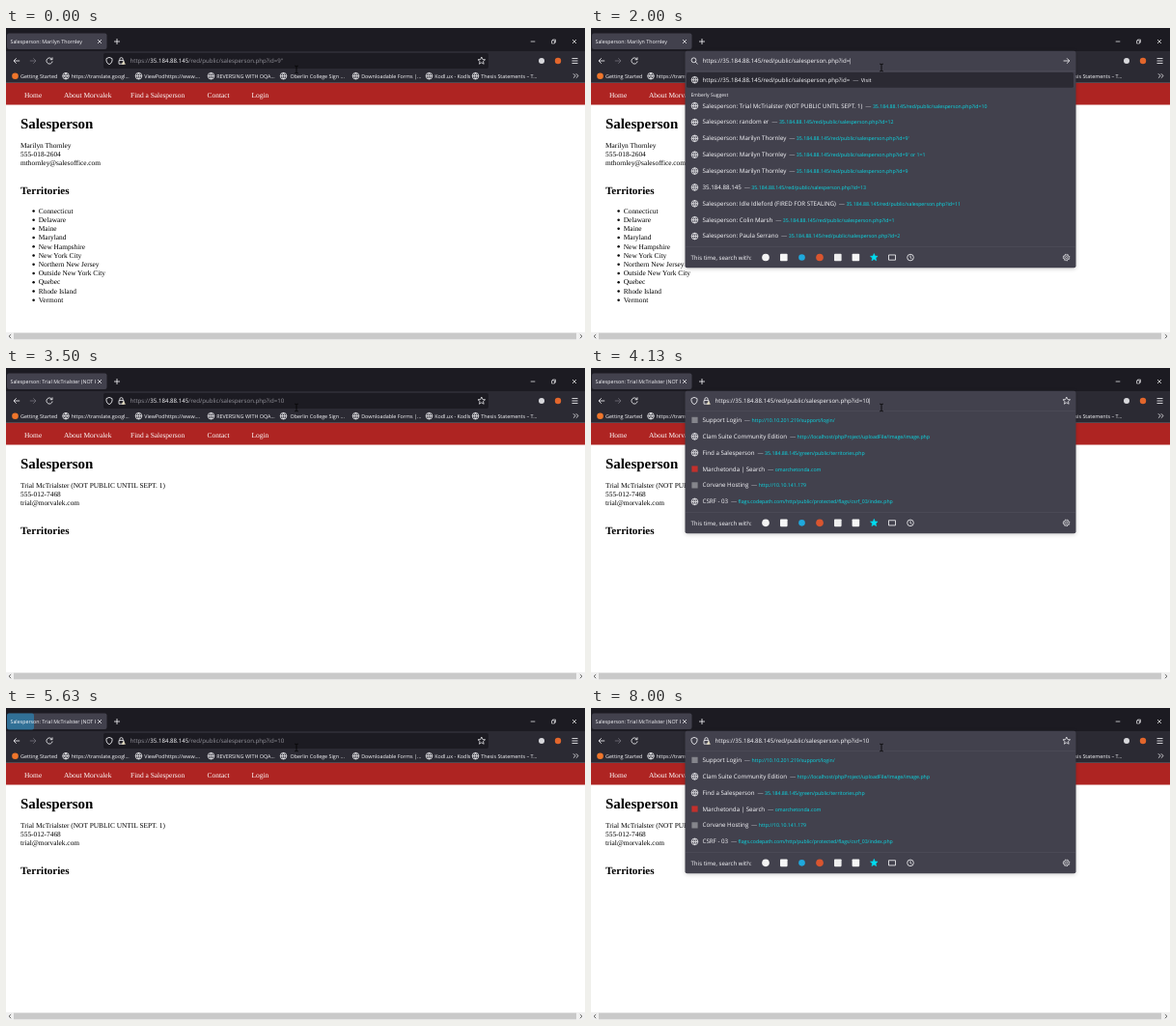
These frames come from a looping animation (600x323 px, 8120 ms). An HTML page:

```html
<!DOCTYPE html>
<html lang="en">
<head>
<meta charset="utf-8">
<title>Salesperson lookup</title>
<style>
html, body { margin: 0; width: 100%; height: 100%; overflow: hidden; background: #fff; }
#stage { display: block; width: 600px; height: 323px; }
text { font-family: "Open Sans", "Noto Sans", sans-serif; text-rendering: geometricPrecision; white-space: pre; }
.page { font-family: "Liberation Serif", "Times New Roman", serif; }
.shadow { filter: drop-shadow(0 1px 2px #0003); }
</style>
</head>
<body>
<svg id="stage" viewBox="0 0 600 323"></svg>
<script>
const LOOP = 8120, ROW = 16.87;
const LIGHT = '#fbfbfe', PANEL = '#42414d', BAR = '#2b2a33', DARK = '#1c1b22', CYAN = '#08dde8';
const HOST = '35.184.88.145', PATH = '/red/public/salesperson.php?id=';

// start, page, id in the address bar, mode of the drop-down
const CLOSED = 0, TOP = 1, STALE = 2, MATCH = 3;
const steps = [
  [0, 0, '9"', CLOSED], [500, 0, '9"', TOP], [1380, 0, '9', STALE], [1630, 0, '', MATCH],
  [2500, 0, '1', MATCH], [2750, 0, '10', MATCH], [3000, 0, '10', CLOSED], [3250, 1, '10', CLOSED],
  [3880, 1, '10', TOP], [4880, 1, '1', STALE], [5000, 1, '', STALE], [5250, 1, '', MATCH],
  [5380, 1, '10', MATCH], [5500, 1, '10', CLOSED], [6500, 1, '10', TOP]
];
const bursts = [3130, 5630], BURST = 370;

const pages = [
  { name: 'Marilyn Thornley', phone: '555-018-2604', mail: 'mthornley@salesoffice.com',
    places: ['Connecticut', 'Delaware', 'Maine', 'Maryland', 'New Hampshire', 'New York City',
      'Northern New Jersey', 'Outside New York City', 'Quebec', 'Rhode Island', 'Vermont'] },
  { name: 'Trial McTrialster (NOT PUBLIC UNTIL SEPT. 1)', phone: '555-012-7468',
    mail: 'trial@morvalek.com', places: [] }
];
const topSites = [
  ['Support Login', 'http://10.10.201.219/support/login/', '#85858c'],
  ['Clam Suite Community Edition', 'http://localhost/phpProject/uploadFile/Image/image.php'],
  ['Find a Salesperson', HOST + '/green/public/territories.php'],
  ['Marchetonda | Search', 'omarchetonda.com', '#c3302c'],
  ['Corvane Hosting', 'http://10.10.141.179', '#85858c'],
  ['CSRF - 03', 'flags.codepath.com/http/public/protected/flags/csrf_03/index.php']
];
const people = [
  [pages[1].name, '10'], ['random er', '12'], [pages[0].name, "9'"], [pages[0].name, "9' or 1=1"],
  [pages[0].name, '9'], ['', '13'], ['Idle Idleford (FIRED FOR STEALING)', '11'],
  ['Colin Marsh', '1'], ['Paula Serrano', '2']
];
const bookmarks = [
  [62, 'https://translate.googl...'], [137.5, 'ViewPodhttps://www....'], [212.5, 'REVERSING WITH OQA...'],
  [287.5, ' Oberlin College Sign ...'], [362.5, 'Downloadable Forms |...'], [438.5, 'Kodl.ux - Kodls'],
  [486.5, 'Thesis Statements – T...']
];

const text = (x, y, s, size, fill = LIGHT, more = '') =>
  `<text x="${x}" y="${y}" font-size="${size}" fill="${fill}" ${more}>${s}</text>`;
const serif = (x, y, s, size = 7.38, fill = '#000', more = '') => text(x, y, s, size, fill, 'class="page" ' + more);
const rect = (x, y, w, h, fill, r = 0, more = '') =>
  `<rect x="${x}" y="${y}" width="${w}" height="${h}" rx="${r}" fill="${fill}" ${more}/>`;
const disc = (x, y, r, fill) => `<circle cx="${x}" cy="${y}" r="${r}" fill="${fill}"/>`;
const icon = (x, y, d, color = LIGHT, width = .8, fill = 'none', more = '') =>
  `<path transform="translate(${x} ${y})" d="${d}" fill="${fill}" stroke="${color}" stroke-width="${width}" ${more}/>`;

const ring = r => `M${-r} 0a${r} ${r} 0 1 0 ${2 * r} 0a${r} ${r} 0 1 0 ${-2 * r} 0`;
const globe = (x, y) => icon(x, y, ring(3.3) + 'M-3.3 0H3.3M0-3.3Q-3 0 0 3.3Q3 0 0-3.3', LIGHT, .75);
const starPath = 'M' + Array.from({ length: 10 }, (_, i) => {
  const r = i % 2 ? 1.8 : 4, a = i * Math.PI / 5;
  return (r * Math.sin(a)).toFixed(2) + ' ' + (-r * Math.cos(a)).toFixed(2);
}).join('L') + 'Z';
const cross = 'M-2-2L2 2M2-2L-2 2';
const arrow = 'M-3.2 0H3M.3-2.7L3 0L.3 2.7';

function webPage({ name, phone, mail, places }) {
  const nav = [[19, 'Home'], [60, 'About Morvalek'], [129, 'Find a Salesperson'], [208.5, 'Contact'], [254.5, 'Login']];
  return rect(0, 56.8, 600, 22.7, '#ae2422') +
    nav.map(([x, s]) => serif(x, 71.6, s, 7.45, '#fff')).join('') +
    serif(15, 104.2, 'Salesperson', 14.9, '#000', 'font-weight="bold"') +
    [name, phone, mail].map((s, i) => serif(15, 124.4 + i * 8.9, s)).join('') +
    serif(15, 172.2, 'Territories', 11.05, '#000', 'font-weight="bold"') +
    places.map((s, i) => disc(28.6, 189.4 + i * 9.23, 1.25, '#000') + serif(33.8, 191.6 + i * 9.23, s)).join('') +
    rect(0, 315, 600, 8, '#f0f0f0') + rect(8, 315.7, 583, 6.6, '#c9c9c9') +
    icon(4, 319.2, 'M1.2-2L-1 0L1.2 2', '#444') + icon(596, 319.2, 'M-1.2-2L1 0L-1.2 2', '#444');
}

function chrome(page, id, fade) {
  const burst = fade ? rect(1, 5.5, 28, 17, '#2790c8', 2, `opacity="${(.6 * fade).toFixed(2)}"`) : '';
  return rect(0, 0, 600, 24, DARK) + rect(0, 24, 600, 32.8, BAR) +
    rect(1, 5.5, 103.5, 16.5, PANEL, 2) + burst +
    `<svg width="93" height="24">${text(4.5, 15.9, 'Salesperson: ' + page.name, 5.3)}</svg>` +
    icon(97, 14, cross, LIGHT, .7) + icon(115, 14, 'M-3 0H3M0-3V3') +
    icon(546, 14, 'M-2.3 0H2.3', LIGHT, .7) + icon(567.5, 14, 'M-2-1H1V2H-2ZM-1-1V-2H2V1H1', LIGHT, .6) +
    icon(589, 14, cross, LIGHT, .7) +
    icon(11, 34, 'M3.2 0H-3M-.3-2.7L-3 0L-.3 2.7') + icon(28, 34, arrow, '#74737c') +
    icon(45, 34, 'M2.7-1.6A3.1 3.1 0 1 0 3.1.5M3-3.6V-1.3H.7') +
    rect(101, 26, 399, 16, DARK, 2) +
    text(128.5, 36.2, `https://<tspan fill="${LIGHT}">${HOST}</tspan>${PATH + id}`, 6.12, '#94939b') +
    siteIcons() + disc(555, 34, 3, '#d8d8dc') + disc(572, 34, 3.2, '#e2662c') +
    icon(589.5, 34, 'M-3-2.5H3M-3 0H3M-3 2.5H3') +
    disc(9.5, 49.7, 3.3, '#f0762b') + text(15, 51.6, 'Getting Started', 5.45) +
    bookmarks.map(([x, s]) => globe(x, 49.7) + text(x + 5.7, 51.6, s, 5.4)).join('') +
    icon(590.5, 49.5, 'M-2.6-2.2L-.4 0L-2.6 2.2M.3-2.2L2.5 0L.3 2.2');
}

const siteIcons = () =>
  icon(107, 34, 'M0-3.6L3-2.4V0Q2.6 2.6 0 3.7Q-2.6 2.6-3 0V-2.4Z') +
  icon(119.5, 34, 'M-2.5-.4H2.5V3.2H-2.5ZM-1.6-.4V-1.8A1.6 1.6 0 0 1 1.6-1.8V-.4') +
  icon(121.8, 36, 'M0-1.6L1.7 1.4H-1.7Z', '#e4dcc0', .5, '#e4dcc0') +
  icon(492.8, 34, starPath, LIGHT, .7);

function row([title, url, color], y) {
  const mark = color ? rect(104.4, y - 3.2, 6.2, 6.2, color) : globe(107.5, y);
  return mark + text(115.5, y + 1.9, `${title}<tspan dx="2.8" fill="#b5b5bd">—</tspan>` +
    `<tspan dx="1.5" font-size="5.22" fill="${CYAN}">${url}</tspan>`, 6.2);
}

function searchRow(y) {
  return rect(98, y - 11.2, 404, .5, '#52515d') + text(103.5, y + 2.2, 'This time, search with:', 6.1) +
    disc(181, y, 3.8, '#f3f3f3') + rect(196, y - 3.8, 7.6, 7.6, '#f6f6f6', .8) +
    disc(218.5, y, 3.3, '#1fa9dd') + disc(237, y, 3.8, '#d9552f') +
    rect(252, y - 3.8, 7.6, 7.6, '#eee', .8) + rect(270.6, y - 3.8, 7.6, 7.6, '#f6f6f6', .8) +
    icon(293.3, y, starPath, '#00ddf0', .6, '#00ddf0') +
    icon(312, y, 'M-3.5-2.6H3.5V2.6H-3.5Z') + icon(331, y, ring(3.3) + 'M0-2V.2L1.4 1.2') +
    icon(492.6, y, ring(2.7) + ring(1.1), LIGHT, .6) +
    icon(492.6, y, ring(3.3), LIGHT, .8, 'none', 'stroke-dasharray="1.3 1.3"');
}

function dropDown(id, mode, caretOn) {
  const address = `https://${HOST}${PATH}${id}`, edited = mode !== TOP;
  const rows = mode === MATCH
    ? people.filter(p => p[1].startsWith(id)).map(([name, n]) => [name ? 'Salesperson: ' + name : HOST, HOST + PATH + n])
    : topSites.slice(edited ? 1 : 0);
  const first = edited ? 80.6 : 54, search = first + ROW * (rows.length - 1) + 22;
  const caret = caretOn ? '<tspan dx="-1.2">|</tspan>' : '';
  let out = rect(97.5, 23.7, 405, search - 12.9, PANEL, 2, 'class="shadow"') + rect(98, 44.4, 404, .5, '#52515d') +
    text(edited ? 115.5 : 128.5, 36.2, address + caret, 6.12);
  if (edited) {
    out += icon(106.5, 33.3, ring(2.4) + 'M1.7 1.7L4 4') + icon(492.8, 34, arrow) +
      rect(99, 46, 401, 15.8, BAR, 1.5) + globe(107.5, 53.7) +
      text(115.5, 55.9, address + '<tspan dx="3" fill="#b5b5bd">—</tspan><tspan dx="2.5" font-size="5.6">Visit</tspan>', 6.12) +
      text(103.5, 70.7, 'Emberly Suggest', 5);
  } else out += siteIcons();
  return out + rows.map((r, i) => row(r, first + i * ROW)).join('') + searchRow(search);
}

const stage = document.getElementById('stage');
let shown = '';

function draw(now) {
  const t = now % LOOP;
  const [start, page, id, mode] = steps.filter(s => s[0] <= t).pop();
  const caretOn = (t - start) % 1000 < 500;
  const hit = bursts.find(b => t >= b && t < b + BURST);
  const fade = hit ? 1 - Math.floor((t - hit) / 125) / 3 : 0;
  const pointerY = t < 130 ? 43 : 41;
  const key = [start, caretOn, fade, pointerY].join();
  if (key !== shown) {
    shown = key;
    stage.innerHTML = rect(0, 0, 600, 323, '#fff') + webPage(pages[page]) + chrome(pages[page], id, fade) +
      (mode ? dropDown(id, mode, caretOn) : '') +
      icon(301, pointerY, 'M-1.8-3.8Q0-3.8 0-3Q0-3.8 1.8-3.8M0-3V3M-1.8 3.8Q0 3.8 0 3Q0 3.8 1.8 3.8', '#050505', .9);
  }
  requestAnimationFrame(draw);
}
requestAnimationFrame(draw);
</script>
</body>
</html>
```
